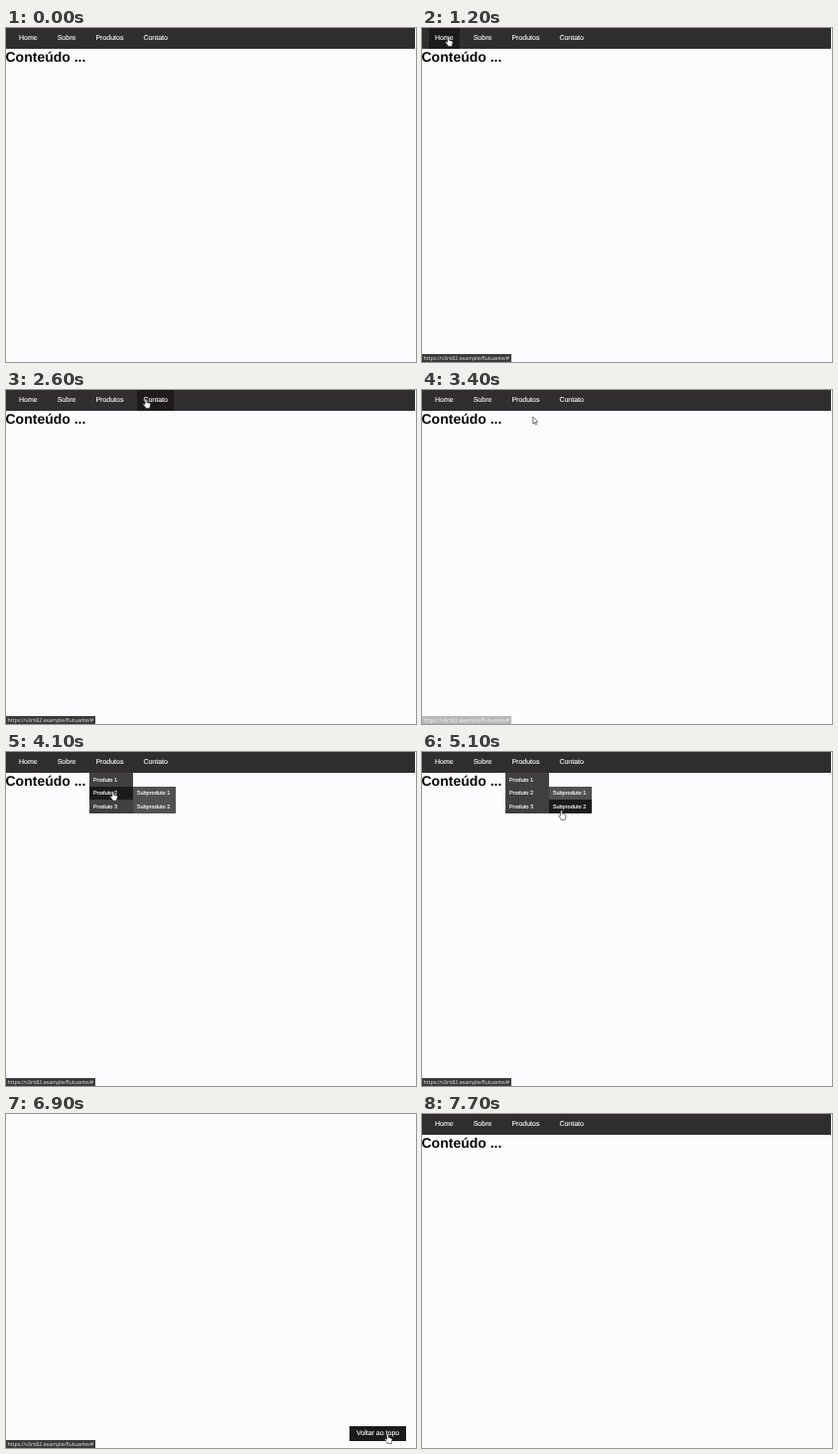
An HTML page for the animation above (8.8 s loop, 413 px wide and 337 px high).

```html
<!DOCTYPE html>
<html lang="pt">
<head>
<meta charset="utf-8">
<title>Menu suspenso</title>
<style>
html, body { margin: 0; width: 100%; height: 100%; overflow: hidden; background: #fcfbfd; }
svg { display: block; text-rendering: geometricPrecision; font-family: "Liberation Sans", Arial, sans-serif; cursor: none; }
rect { shape-rendering: crispEdges; }
.label { fill: #fff; stroke: #fff; stroke-width: .12; }
#status text { font: 5.25px "Open Sans", sans-serif; fill: #eee; }
#cursor path { stroke: #222; stroke-width: .6; stroke-linejoin: round; fill: #fff; }
</style>
</head>
<body>
<svg width="413" height="337" viewBox="0 0 413 337">
  <g id="page">
    <rect width="412" height="21" fill="#312e30"/>
    <text x="-.5" y="34" font-size="14" font-weight="bold" fill="#080808">Conteúdo ...</text>
    <g id="nav"></g>
    <g id="menu"></g>
    <g id="submenu"></g>
  </g>
  <g id="top"></g>
  <g id="status">
    <rect y="329" width="90" height="8" fill="#3b3b3c"/>
    <text x="1.5" y="335.3">https://v3rti82.example/flutuante/#</text>
  </g>
  <g id="cursor">
    <path id="arrow" d="M0 0V7.2L1.6 5.7 2.6 8 3.7 7.5 2.7 5.2H4.9Z"/>
    <path id="hand" d="M-.9 .7Q0 -.5 .9 .7V3.5L3.8 4.2Q4.7 4.6 4.5 5.8L3.9 8V9.4H-.6V8.4L-2.9 5.5Q-2.5 4.2 -.9 5.4Z"/>
  </g>
</svg>
<script>
const LOOP = 8800, STEP = 100, HOVER = '#1c1a1c';
const ITEM_WIDTH = 43.8, ITEM_HEIGHT = 13.6, NAV_PAD = 6.5, NAV_GAP = 7;
const styles = {
  nav: { height: 21, size: 7, pad: NAV_PAD, baseline: 12.2, fill: '#312e30' },
  menu: { height: ITEM_HEIGHT, size: 5.6, pad: 4, baseline: 8.7, fill: '#414041' },
  submenu: { height: ITEM_HEIGHT, size: 5.6, pad: 4, baseline: 8.7, fill: '#525152' },
  top: { height: 15, size: 7, pad: 7, baseline: 9.9, fill: '#312e30' }
};
const links = [];
const $ = id => document.getElementById(id);
const show = (id, on) => { $(id).style.display = on ? '' : 'none'; };
const between = (t, from, to) => t >= from && t < to;

function svg(tag, parent, attrs) {
  const el = document.createElementNS('http://www.w3.org/2000/svg', tag);
  for (const key in attrs) el.setAttribute(key, attrs[key]);
  return parent.appendChild(el);
}

// Adds a link box as wide as its text unless a width is given
function addLink(group, label, x, y, width) {
  const { height, size, pad, baseline, fill } = styles[group];
  const box = svg('rect', $(group), { x, y, height, fill });
  const text = svg('text', $(group), { class: 'label', x: x + pad, y: y + baseline, 'font-size': size });
  text.textContent = label;
  width = width || text.getComputedTextLength() + 2 * pad;
  box.setAttribute('width', width);
  const link = { group, box, x, y, width, height, fill };
  links.push(link);
  return link;
}

let navX = NAV_PAD;
const [, , products] = ['Home', 'Sobre', 'Produtos', 'Contato'].map(label => {
  const link = addLink('nav', label, navX, 0);
  navX += link.width + NAV_GAP;
  return link;
});

function addMenu(group, label, count, x, y) {
  for (let i = 0; i < count; i++) addLink(group, `${label} ${i + 1}`, x, y + i * ITEM_HEIGHT, ITEM_WIDTH);
}
addMenu('menu', 'Produto', 3, products.x, 21);
addMenu('submenu', 'Subproduto', 2, products.x + ITEM_WIDTH, 21 + ITEM_HEIGHT);
addLink('top', 'Voltar ao topo', 346, 314.5);

// Pointer moves: start, end, target x, target y
const moves = [
  [300, 1100, 26.5, 9],
  [1200, 1800, 104, 11],
  [1900, 2400, 141, 9],
  [2600, 3100, 144, 19],
  [3100, 3400, 111.8, 27],
  [3400, 3600, 105, 11],
  [3600, 4200, 108, 42],
  [4400, 4700, 138, 42],
  [4700, 5100, 140.5, 59],
  [5100, 5300, 172, 128],
  [6000, 6100, 228.5, 190],
  [6100, 6900, 384.5, 323]
];

function pointerAt(t) {
  let x = 386, y = 320;
  for (const [start, end, toX, toY] of moves) {
    const k = Math.min(1, Math.max(0, (t - start) / (end - start)));
    const eased = k * k * (3 - 2 * k);
    x += (toX - x) * eased;
    y += (toY - y) * eased;
  }
  return [x, y];
}

// The address bubble is half faded on its first and last step
function statusOpacity(t) {
  const span = [[1100, 3400], [3600, 5400], [6800, 7300]].find(([on, off]) => t >= on && t <= off);
  return !span ? 0 : span.includes(t) ? .35 : 1;
}

function draw(t) {
  const visible = {
    nav: true,
    menu: between(t, 1700, 2200) || between(t, 3500, 5200),
    submenu: between(t, 4100, 5200),
    top: between(t, 5700, 7100),
    cursor: between(t, 300, 7700)
  };
  for (const id in visible) show(id, visible[id]);

  const scroll = between(t, 5400, 7100) ? Math.min(60, (t - 5300) * .3) : 0;
  $('page').setAttribute('transform', `translate(0 ${-scroll})`);
  $('status').setAttribute('opacity', statusOpacity(t));

  const [x, y] = pointerAt(t);
  let over = false;
  for (const link of links) {
    const top = link.y - (link.group === 'top' ? 0 : scroll);
    const hit = visible.cursor && visible[link.group] &&
      between(x, link.x, link.x + link.width) && between(y, top, top + link.height);
    link.box.setAttribute('fill', hit ? HOVER : link.fill);
    over = over || hit;
  }
  $('cursor').setAttribute('transform', `translate(${x} ${y})`);
  show('hand', over);
  show('arrow', !over);
}

function tick() {
  draw(Math.floor(performance.now() % LOOP / STEP) * STEP);
  requestAnimationFrame(tick);
}
tick();
</script>
</body>
</html>
```
